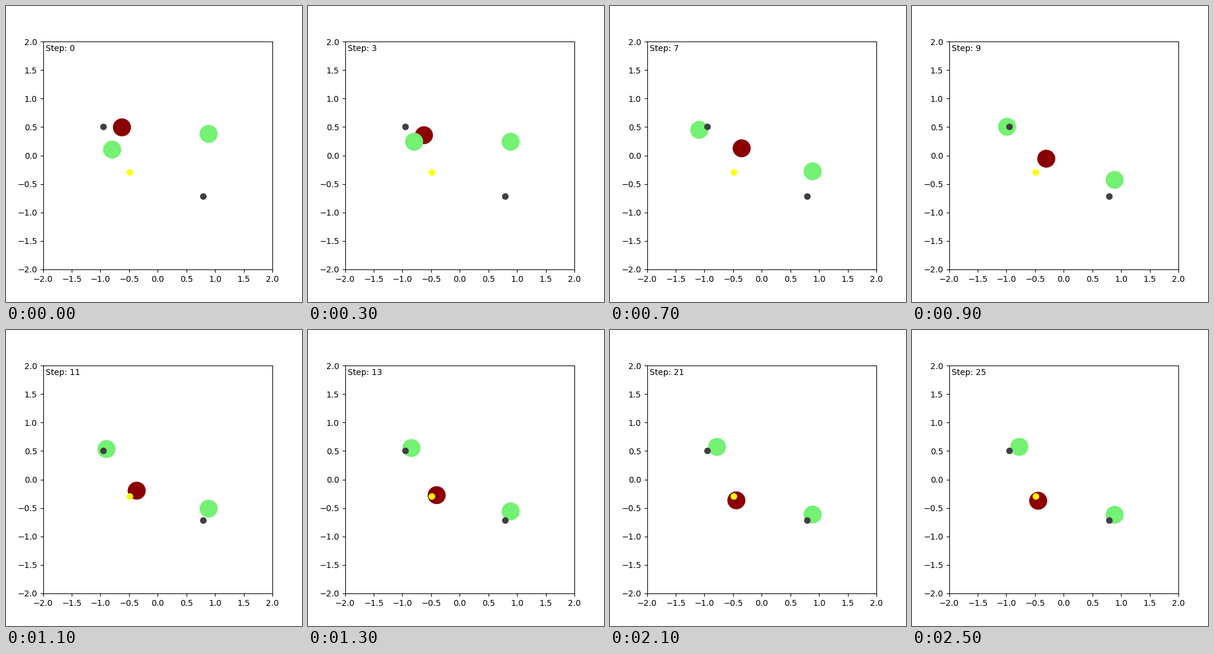
A matplotlib script that plays this animation: 500 px wide and 500 px high, repeating every 2.6 s.

```python
import numpy as np
import matplotlib.pyplot as plt
from matplotlib.animation import FuncAnimation
from matplotlib.patches import Circle

STEPS = 26
DAMPING = 0.75
PUSH = 0.05          # displacement per step added by one action
AGENT_RADIUS = 0.15
DOT_RADIUS = 0.05
SOFTNESS = 0.001

MOVES = {"u": (0, 1), "d": (0, -1), "l": (-1, 0), "r": (1, 0), ".": (0, 0)}
GREEN = (0.45, 0.95, 0.45)
GREY = (0.25, 0.25, 0.25)

# start, colour, one action per step
AGENTS = [
    ((-0.6235, 0.4935), "darkred", "dddrllddl"),
    ((-0.7945, 0.1035), GREEN, "uulurrrr"),
    ((0.888, 0.379), GREEN, "ddddd"),
]
LANDMARKS = [
    ((-0.945, 0.502), GREY),
    ((0.796, -0.720), GREY),
    ((-0.485, -0.298), "yellow"),
]


def contact(pos):
    """Soft repulsion between every pair of overlapping agents."""
    push = np.zeros_like(pos)
    for i in range(len(pos)):
        for j in range(i):
            gap = pos[i] - pos[j]
            dist = np.hypot(*gap)
            depth = SOFTNESS * np.logaddexp(0, (2 * AGENT_RADIUS - dist) / SOFTNESS)
            push[i] += depth * gap / dist
            push[j] -= depth * gap / dist
    return push


def simulate():
    pos = np.array([start for start, _, _ in AGENTS])
    vel = np.zeros_like(pos)
    path = [pos]
    for step in range(STEPS - 1):
        actions = [plan[step:step + 1] or "." for _, _, plan in AGENTS]
        force = PUSH * np.array([MOVES[a] for a in actions]) + contact(pos)
        pos = pos + vel
        vel = DAMPING * vel + force
        path.append(pos)
    return path


path = simulate()

fig, ax = plt.subplots(figsize=(5, 5), dpi=100)
ax.set_xlim(-2, 2)
ax.set_ylim(-2, 2)

bodies = [ax.add_patch(Circle(start, AGENT_RADIUS, color=color))
          for start, color, _ in AGENTS]
for center, color in LANDMARKS:
    ax.add_patch(Circle(center, DOT_RADIUS, color=color))
label = ax.text(-1.95, 1.95, "", va="top", fontsize=10)


def draw(step):
    for body, center in zip(bodies, path[step]):
        body.center = tuple(center)
    label.set_text(f"Step: {step}")
    return [*bodies, label]


anim = FuncAnimation(fig, draw, frames=STEPS, interval=100,
                     repeat=True, repeat_delay=0)
plt.show()
```
